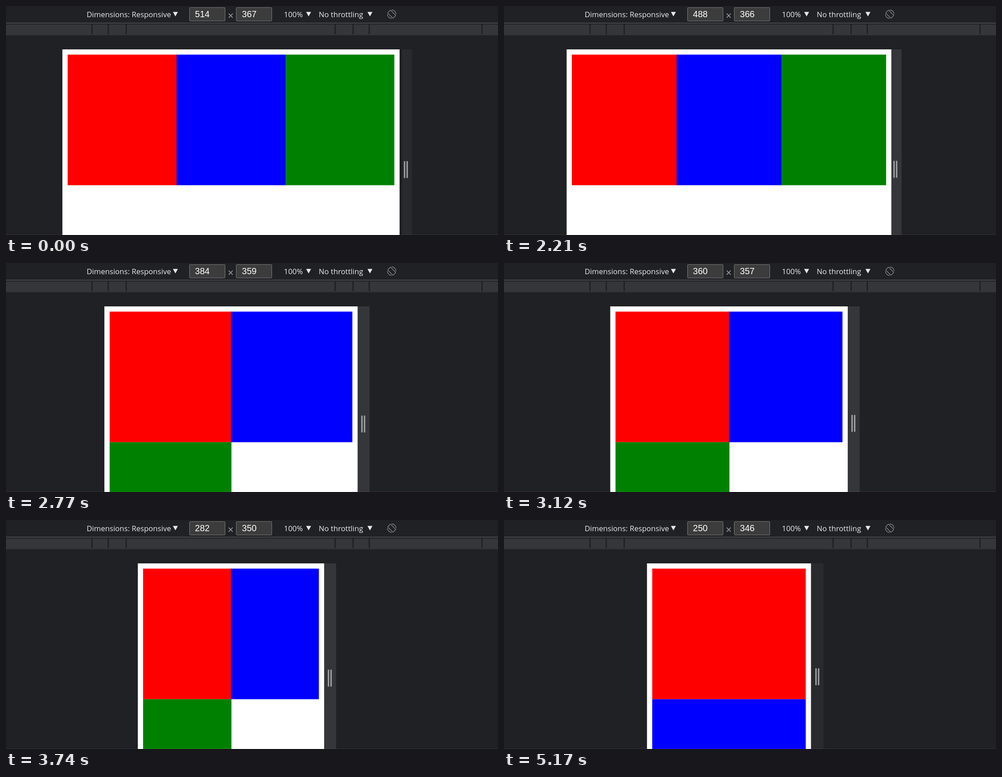
Animation of 1095 by 512 pixels, one loop 5.64 s. Source, as an HTML page:

```html
<!DOCTYPE html>
<html lang="en">
<head>
<meta charset="utf-8">
<title>Responsive columns</title>
<style>
  html, body { margin: 0; width: 100%; height: 100%; overflow: hidden; background: #202124; }
  svg { display: block; width: 1095px; height: 512px; }
  text { font: 16.6px "Open Sans", "Noto Sans", sans-serif; fill: #e8eaed; }
  .field { fill: #3b3c3b; stroke: #7c7d7d; }
  .num { font: 19.6px "Liberation Sans", Arial, sans-serif; fill: #fff; }
  .times { font-size: 23px; fill: #9aa0a6; text-anchor: middle; }
  .icon { fill: none; stroke: #85878a; stroke-width: 1.4; }
</style>
</head>
<body>
<svg viewBox="0 0 1095 512">
  <rect width="1095" height="512" fill="#202124"/>

  <text x="179.5" y="25">Dimensions: Responsive</text>
  <text x="618.5" y="25">100%</text>
  <text x="696" y="25">No throttling</text>
  <path d="M371.5 13.3h11l-5.5 10zM668 13.3h11l-5.5 10zM804.5 13.3h11l-5.5 10z" fill="#e8eaed"/>
  <rect class="field" x="408.5" y="3.5" width="79" height="30" rx="1"/>
  <rect class="field" x="512.5" y="3.5" width="79" height="30" rx="1"/>
  <text class="num" id="wide" x="420.5" y="25"></text>
  <text class="num" id="high" x="525" y="25"></text>
  <text class="times" x="500" y="29.5">×</text>
  <g class="icon" transform="translate(858.5 18.3)">
    <rect x="-8.5" y="-4.5" width="17" height="9" rx="1" transform="rotate(45)"/>
    <path d="M0 -9.6A9.6 9.6 0 0 1 9.6 0M0 9.6A9.6 9.6 0 0 1 -9.6 0"/>
  </g>

  <rect y="37.6" width="1095" height="1.4" fill="#56585b"/>
  <rect y="41.3" width="1095" height="24" fill="#35363a"/>
  <g id="ticks" fill="#202124"></g>

  <rect id="strip" y="97" height="415"/>
  <g id="grip" fill="#a3a4a6">
    <rect x="-4.4" y="-19" width="3" height="38" rx="1"/>
    <rect x="1.4" y="-19" width="3" height="38" rx="1"/>
  </g>
  <rect id="page" y="97" height="415" fill="#fff"/>
  <g id="boxes"></g>
  <rect y="511" width="1095" height="1" fill="#808386" opacity=".2"/>
  <path id="pointer" d="M0 0V22L5 17.5L8.5 25.5L12 24L8.6 16.3H15.5Z" fill="#fff" stroke="#000"/>
</svg>
<script>
const LOOP = 5640, TICK = 70;
const ZOOM = 1.46, CENTER = 500.75, TOP = 97;
const COLORS = ['#f00', '#00f', '#008000'];
const MIN_COLUMN = 130, MARGIN = 8, ROW = 200;
const GRAB = 1410, DRAG = 2140, DROP = 3960, LEAVE = 4690, GONE = 5170;

// [time, viewport width] while dragging
const DRAG_PATH = [[2070, 512], [2490, 440], [2770, 384], [3460, 336], [3880, 256], [3960, 250]];

const $ = id => document.getElementById(id);
const set = (el, attrs) => { for (const k in attrs) el.setAttribute(k, attrs[k]); return el; };
const addRect = (parent, attrs) => parent.appendChild(
  set(document.createElementNS('http://www.w3.org/2000/svg', 'rect'), attrs));
const span = (el, left, right) => set(el, { x: left, width: right - left });
const even = v => 2 * Math.round(v / 2);
const step = (t, from) => from + TICK * Math.floor((t - from) / TICK);

for (const x of [190, 226, 266, 731, 771, 807, 1058])
  addRect($('ticks'), { x, y: 41, width: 3, height: 22 });
const boxes = COLORS.map(fill => addRect($('boxes'), { fill, height: ROW * ZOOM }));

function widthAt(t) {
  if (t < GRAB) return 514;
  if (t < DRAG) return 512;
  if (t >= DROP) return 250;
  const q = t < 3390 ? step(t, DRAG) : Math.min(3880, step(t, 3390));
  const i = DRAG_PATH.findIndex(([time]) => time >= q);
  const [t0, a] = DRAG_PATH[i - 1], [t1, b] = DRAG_PATH[i];
  return even(a + (b - a) * (q - t0) / (t1 - t0));
}

// The hand sinks a little as it moves left
const heightAt = width => Math.round(367 - 21 * (Math.max(0, 512 - width) / 262) ** 1.4);

// The page repaints slightly behind the frame
const lagAt = t => t < DRAG || t >= DROP ? 0 : t < 2770 ? 7 : 2;

function layout(width) {
  const half = width * ZOOM / 2;
  span($('page'), CENTER - half, CENTER + half);
  const inner = width - 2 * MARGIN;
  const cols = Math.max(1, Math.min(COLORS.length, Math.floor(inner / MIN_COLUMN)));
  const left = CENTER - inner * ZOOM / 2, right = CENTER + inner * ZOOM / 2;
  const cell = (right - left) / cols;
  boxes.forEach((box, i) => {
    const x = left + (i % cols) * cell;
    span(box, x, Math.min(x + cell + 1, right)); // overlap hides the seam
    set(box, { y: TOP + (MARGIN + ROW * Math.floor(i / cols)) * ZOOM });
  });
}

function drawPointer(t) {
  const p = ((step(t, LEAVE) - LEAVE) / (6 * TICK)) ** 1.5;
  const shown = t >= LEAVE && t < GONE;
  set($('pointer'), { visibility: shown ? 'visible' : 'hidden' });
  if (shown) set($('pointer'), { transform: `translate(${941 + 136 * p} ${236 + 230 * p})` });
}

function draw(t) {
  const width = widthAt(t), height = heightAt(width);
  const edge = CENTER + width * ZOOM / 2;

  $('wide').textContent = width;
  $('high').textContent = height;
  layout(width + lagAt(t));

  const hovered = t >= GRAB && t < LEAVE;
  span($('strip'), edge + (t < DRAG ? 6 : 0), edge + 28);
  set($('strip'), { fill: hovered ? '#35363a' : '#292a2d' });
  set($('grip'), { transform: `translate(${edge + 14} ${TOP + 0.9 + height * ZOOM / 2})` });
  drawPointer(t);
}

const start = performance.now();
function tick() {
  draw((performance.now() - start) % LOOP);
  requestAnimationFrame(tick);
}
tick();
</script>
</body>
</html>
```
